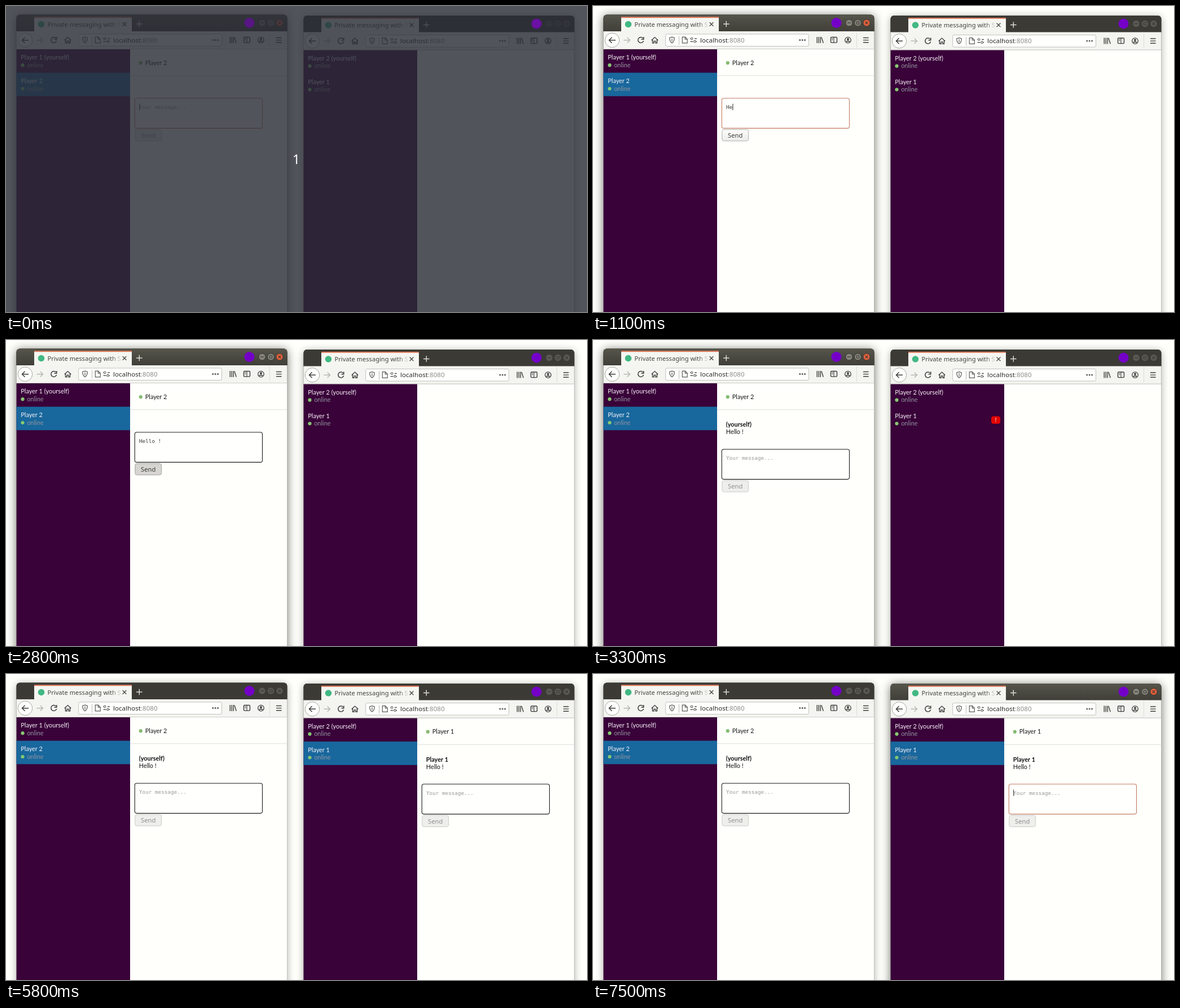
Animation of 1030 by 544 pixels, one loop 8000 ms. Source, as an HTML page with a canvas:

```html
<!DOCTYPE html>
<html lang="en">
<head>
<meta charset="utf-8">
<title>Private messaging</title>
<style>
html, body { margin: 0; width: 100%; height: 100%; overflow: hidden; background: #fffffc; }
canvas { display: block; }
</style>
</head>
<body>
<canvas id="stage" width="1030" height="544"></canvas>
<script>
const LOOP = 8000;
const ctx = document.getElementById('stage').getContext('2d');
const UI = '"Noto Sans", sans-serif';
const PAGE = '10.9px Lato, sans-serif';
const PAGE_BOLD = 'bold ' + PAGE;
const MONO = '9.3px "DejaVu Sans Mono", monospace';
const PAPER = '#fffffc', INK = '#3c3c3a';
const KEYS = [700, 1100, 1300, 1500, 1700, 1800, 2000];
const MESSAGE = 'Hello !';

function rect(x, y, w, h, fill) {
  ctx.fillStyle = fill;
  ctx.fillRect(x, y, w, h);
}

function box(x, y, w, h, r, fill, stroke, width = 1) {
  ctx.beginPath();
  ctx.roundRect(x, y, w, h, r);
  if (fill) { ctx.fillStyle = fill; ctx.fill(); }
  if (stroke) { ctx.strokeStyle = stroke; ctx.lineWidth = width; ctx.stroke(); }
}

function disc(x, y, r, fill, stroke, width = 1) {
  ctx.beginPath();
  ctx.arc(x, y, r, 0, Math.PI * 2);
  if (fill) { ctx.fillStyle = fill; ctx.fill(); }
  if (stroke) { ctx.strokeStyle = stroke; ctx.lineWidth = width; ctx.stroke(); }
}

function path(d, stroke = INK, width = 1.3) {
  ctx.strokeStyle = stroke;
  ctx.lineWidth = width;
  ctx.stroke(new Path2D(d));
}

function text(str, x, y, font, fill, align = 'left') {
  ctx.font = font;
  ctx.fillStyle = fill;
  ctx.textAlign = align;
  ctx.fillText(str, x, y);
}

function fade(x0, y0, x1, y1, from, to) {
  const g = ctx.createLinearGradient(x0, y0, x1, y1);
  g.addColorStop(0, from);
  g.addColorStop(1, to);
  return g;
}

function shadow(active) {
  ctx.save();
  ctx.shadowColor = active ? 'rgba(20,24,10,.62)' : 'rgba(20,24,10,.36)';
  ctx.shadowBlur = active ? 17 : 14;
  ctx.shadowOffsetY = 2;
  box(18.5, 15.5, 480, 560, [6, 6, 0, 0], '#3c3b36');
  ctx.restore();
}

function windowButtons(active) {
  const face = active ? '#85847b' : '#5a5953';
  const mark = active ? '#35342f' : '#383732';
  [454, 469.5, 485].forEach((x, i) => {
    const fill = i === 2 && active ? '#e2613d' : face;
    disc(x, 30, 6, fill, active ? '#34332e' : '#403f3a', 0.8);
  });
  path('M451 30h6', mark, 1.1);
  path('M467.2 27.8h4.6v4.4h-4.6z', mark, 1);
  path('M482.7 27.7l4.6 4.6m0-4.6l-4.6 4.6', mark, 1.1);
}

function titleBar(level) {
  const corners = [6, 6, 0, 0];
  box(18.5, 15.5, 480, 30, corners, '#3b3a35');
  ctx.globalAlpha = level;
  box(18.5, 15.5, 480, 30, corners, fade(0, 15, 0, 45, '#57564c', '#3f3e38'));
  ctx.globalAlpha = 1;

  rect(50, 19.5, 173, 26, '#f5f6f1');
  rect(50, 19.3, 173, 1.8, '#dd6d4d');
  disc(62.5, 32.5, 5.8, '#41b883');
  const ink = fade(186, 0, 204, 0, '#42423f', 'rgba(66,66,63,.1)');
  text('Private messaging with S', 73.5, 36.5, '11.1px ' + UI, ink);
  path('M206.6 29l6.8 6.8m0-6.8l-6.8 6.8', '#454542', 1.3);
  path('M231 32h10.6m-5.3-5.3v10.6', '#deded8', 1.4);
  disc(431.5, 30, 9, '#7400c8');
  windowButtons(level > 0.7);
}

function toolBar() {
  rect(18.5, 45, 480, 32, '#f4f4f0');
  rect(18.5, 76, 480, 1, '#cfcfca');

  disc(34, 60.8, 12.7, '#fffffd', '#9d9d98', 0.9);
  path('M40 60.8h-11.5m5-5l-5 5l5 5', INK, 1.5);
  path('M54.5 60.8h11m-4.8-4.8l4.8 4.8l-4.8 4.8', '#b6b6b2', 1.4);
  path('M88.6 57.2a5 5 0 1 0 1 4.8m.2-7v4.2h-4.3', INK, 1.5);
  path('M103.7 61l5.8-5.4l5.8 5.4m-9.8-1.2v6h2.6v-3.4h2.8v3.4h2.6v-6', INK, 1.4);

  box(128.7, 50, 253.8, 21.5, 2.5, '#fffffd', '#c1c1bd');
  path('M140 55.2l4.3 1.2c0 5-1 7.3-4.3 9.3c-3.3-2-4.3-4.3-4.3-9.3zM140 57.6v5.4', '#5a5a57', 1.2);
  path('M152.5 53.5v15.5', '#b9b9b5', 1);
  path('M158.3 55.2h5.2l3.7 3.7v7h-8.9zm5 0v4h4', '#5a5a57', 1.2);
  path('M172.5 58h3.5m4 0h4M172.5 63.2h5m4 0h2.5', '#5a5a57', 1.4);
  disc(175.2, 58, 1.8, '#fffffd', '#5a5a57', 1.1);
  disc(180.6, 63.2, 1.8, '#fffffd', '#5a5a57', 1.1);
  const font = '11.6px ' + UI;
  text('localhost', 190, 64.8, font, '#2c2c2b');
  text(':8080', 190 + ctx.measureText('localhost').width, 64.8, font, '#8c8c89');
  for (const x of [366.8, 371.2, 375.6]) disc(x, 60.5, 1.5, '#5a5a57');

  path('M397.3 55v11m3-11v11m3-11v11m1.6-10.6l3.4 10.4', INK, 1.4);
  box(421.5, 55.5, 11, 9.6, 1.5, null, INK, 1.4);
  path('M427 55.5v9.6m-3.6-7h2m-2 2.2h2', INK, 1.1);
  disc(452, 60.6, 5.3, null, INK, 1.3);
  disc(452, 59, 2, INK);
  path('M448.8 63.6q3.2-2.4 6.4 0', INK, 1.8);
  path('M467.5 47v27', '#deded9', 1);
  path('M479 56.5h9.6m-9.6 4.1h9.6m-9.6 4.1h9.6', INK, 1.4);
}

function user(name, y) {
  text(name, 26.3, y + 18.2, PAGE, '#f7f3f7');
  disc(29.5, y + 28.2, 3.1, '#86c871');
  text('online', 37.2, y + 31.8, PAGE, '#92959e');
}

function sendButton(y, state) {
  const looks = {
    off: ['#eeeeeb', '#cbcbc7', '#8f908e'],
    on: [fade(0, y, 0, y + 21, '#fdfdfb', '#ebebe8'), '#b0afaa', INK],
    down: ['#d6d5d1', '#a3a29d', INK]
  };
  const [fill, edge, ink] = looks[state];
  box(228.8, y, 46.8, 20.3, 3.5, fill, edge);
  text('Send', 252.2, y + 14.5, '11.2px ' + UI, ink, 'center');
}

function chat(c) {
  disc(238.8, 101.2, 3.1, '#86bb71');
  text(c.peer, 246.8, 104.8, PAGE, '#161616');
  rect(220, 123.3, 278.5, 1, '#dcdcda');
  if (c.sender) {
    text(c.sender, 235.8, 154.3, PAGE_BOLD, '#111');
    text(MESSAGE, 235.8, 167.4, PAGE, '#111');
  }
  const y = c.sender ? 194.2 : 164;
  box(228.3, y, 226.2, 53.4, 3.5, '#fffffd', c.focus ? '#c17a62' : '#1c1c1c', 1.1);
  text(c.draft || 'Your message...', 236, y + 19.2, MONO, c.draft ? '#3a3a3a' : '#989896');
  if (c.caret) {
    const w = c.draft ? ctx.measureText(c.draft).width : 0;
    rect(236.2 + w, y + 9.8, 1, 11.4, '#222');
  }
  sendButton(y + 55.6, c.button);
}

function browser(w) {
  ctx.save();
  ctx.translate(w.x, w.y);
  shadow(w.shadow);
  titleBar(w.level);
  toolBar();
  rect(18.5, 77, 480, 480, PAPER);
  rect(18.5, 77, 201.5, 480, '#390239');
  if (w.chat) rect(18.5, 118.6, 201.5, 41.7, '#18679d');
  user(w.self + ' (yourself)', 77);
  user(w.peer, 118.8);
  if (w.badge) {
    box(197, 134, 16, 13.4, 4, '#e00404');
    text('!', 205, 144.6, PAGE, '#ffe4e4', 'center');
  }
  if (w.chat) chat({ peer: w.peer, ...w.chat });
  ctx.restore();
}

function countdown() {
  rect(0, 0, 1030, 544, 'rgba(42,45,55,.81)');
  disc(431.5, 30, 9, '#571683');
  disc(940.5, 31.5, 9, '#6a10a2');
  text('1', 514.5, 280.5, '23px ' + UI, '#fff', 'center');
}

function draw(t) {
  const sent = t >= 3200, pressed = t >= 2800, opened = t >= 5700;
  const draft = sent ? '' : MESSAGE.slice(0, KEYS.filter(k => t >= k).length);
  const focus = !pressed;

  rect(0, 0, 1030, 544, PAPER);
  browser({
    x: 0, y: 0, self: 'Player 1', peer: 'Player 2',
    shadow: t < 5600,
    level: t < 5700 ? 1 : t < 5800 ? 0.5 : 0,
    chat: {
      sender: sent && '(yourself)',
      draft, focus,
      caret: focus && (t < 400 || t >= 700),
      button: !draft ? 'off' : pressed ? 'down' : 'on'
    }
  });
  browser({
    x: 509, y: 1.5, self: 'Player 2', peer: 'Player 1',
    shadow: t >= 6900,
    level: t >= 7000 ? 1 : 0,
    badge: t >= 3300 && !opened,
    chat: opened && {
      sender: 'Player 1', draft: '', button: 'off',
      focus: t >= 7500, caret: t >= 7500
    }
  });
  if (t < 200) countdown();
}

const start = performance.now();
function tick() {
  draw((performance.now() - start) % LOOP);
  requestAnimationFrame(tick);
}
tick();
</script>
</body>
</html>
```
